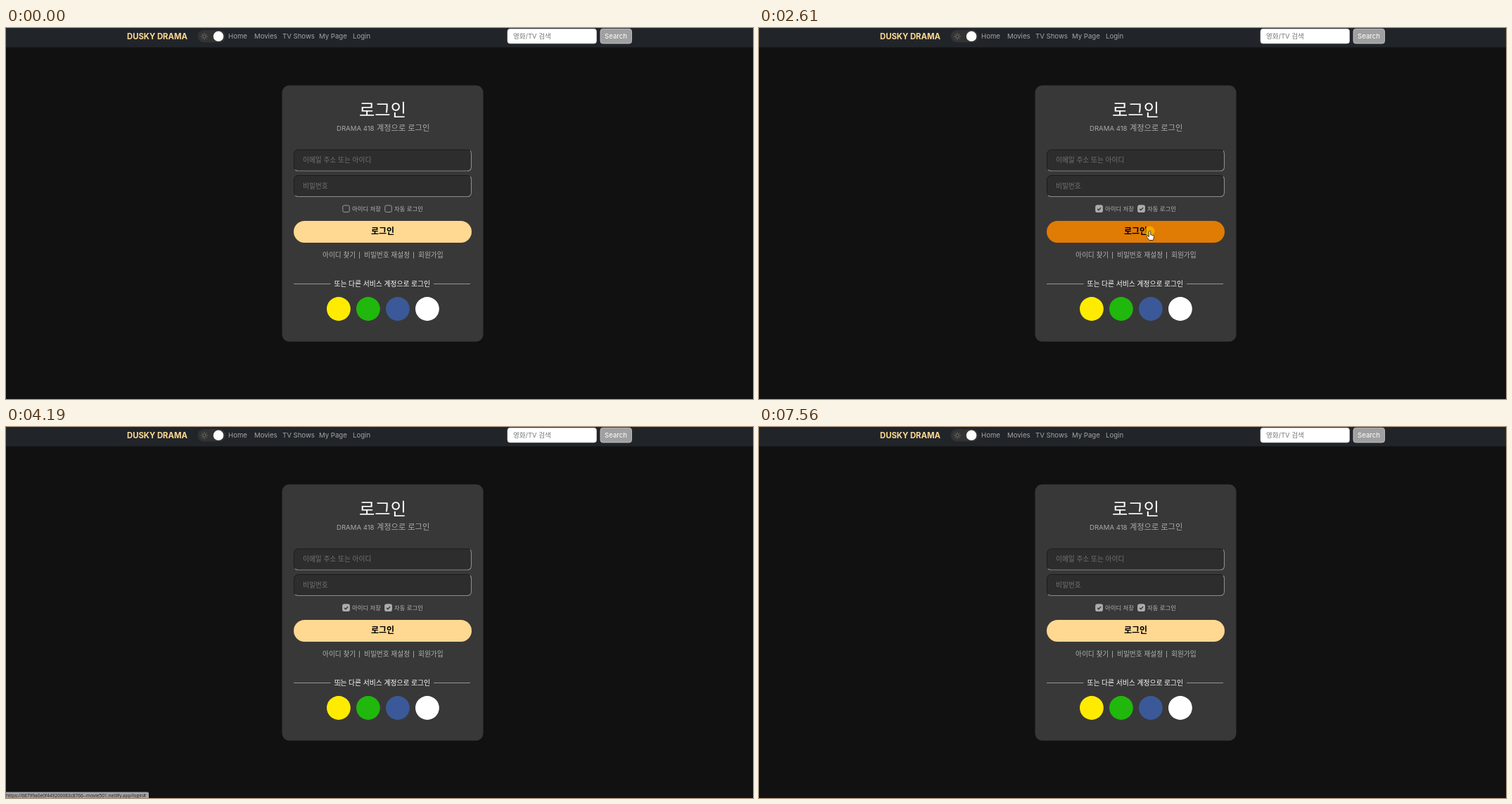
Write an HTML page that moves like this. It is 1062 by 527 pixels and loops after 8300 ms.

```html
<!DOCTYPE html>
<html lang="ko">
<head>
<meta charset="utf-8">
<style>
html, body { margin: 0; width: 100%; height: 100%; overflow: hidden; background: #111; }
svg { display: block; width: 1062px; height: 527px; }
text { font-family: Inter, "Noto Sans CJK KR", "Noto Sans CJK", sans-serif; white-space: pre; }
.system text { font-family: "Open Sans", "Noto Sans CJK KR", "Noto Sans CJK", sans-serif; }
</style>
</head>
<body>
<svg id="stage" viewBox="0 0 1062 527"></svg>
<script>
const LOOP = 8300;
const HOST = '68799a0e0f449200083c8766--movie501.netlify.app';
const stage = document.getElementById('stage');

const text = (x, y, size, fill, str, extra = '') =>
  `<text x="${x}" y="${y}" font-size="${size}" fill="${fill}" ${extra}>${str}</text>`;
const rect = (x, y, w, h, r, fill, extra = '') =>
  `<rect x="${x}" y="${y}" width="${w}" height="${h}" rx="${r}" fill="${fill}" ${extra}/>`;
const circle = (x, y, r, fill, extra = '') =>
  `<circle cx="${x}" cy="${y}" r="${r}" fill="${fill}" ${extra}/>`;
const line = (d, stroke, width = 1, extra = '') =>
  `<path d="${d}" fill="none" stroke="${stroke}" stroke-width="${width}" ${extra}/>`;
const mid = 'text-anchor="middle"';
const hand = id => `id="${id}" data-cursor="hand"`;
const beam = id => `id="${id}" data-cursor="beam"`;

// Input with an inset border, a focus ring and a caret
const field = (id, y, label) =>
  rect(409.5, y, 252, 30, 6, '#2d2d2d', `stroke="#1c1c1c" ${beam(id)}`) +
  line(`M411 ${y + 28.5}q2 1.5 4.5 1.5h240q6 0 6-6v-18q0-3-1.500-4.500`, '#8c8c8c', 1.1) +
  text(422, y + 18, 9.7, '#727575', label) +
  `<g id="${id}Focus">` +
  rect(409.5, y - .5, 252, 30.5, 6, 'none', 'stroke="#eee"') +
  line(`M422.3 ${y + 9.5}v11`, '#ddd', .8, `id="${id}Caret"`) + '</g>';

const check = (id, x, label) =>
  rect(x, 252, 9.5, 9.5, 2, 'none', `stroke="#a5a5a5" stroke-width=".9" ${hand(id)}`) +
  `<g id="${id}Tick">` + rect(x - .5, 251.5, 10.5, 10.5, 2.2, '#acacac') +
  line(`M${x + 2.4} 257l1.7 1.7 3.2-3.6`, '#333', 1.4) + '</g>' +
  text(x + 13.2, 259.8, 8.4, '#b4b4b4', label);

const rays = Array.from({ length: 8 }, (_, i) =>
  line('M282 8.6v-1.7', '#777', .9, `transform="rotate(${i * 45} 282 12)"`)).join('');

const nav =
  rect(0, 0, 1062, 27.5, 0, '#212529') +
  text(172, 15.8, 11.3, '#ffda93', 'DUSKY DRAMA', 'font-weight="700"') +
  rect(272.5, 3, 39.5, 17.5, 8.75, '#333') + circle(302, 11.8, 7.3, '#fff') +
  circle(282, 12, 2.3, 'none', 'stroke="#777" stroke-width=".9"') + rays +
  Object.entries({ Home: 316, Movies: 353, 'TV Shows': 393, 'My Page': 445, Login: 493 })
    .map(([s, x]) => text(x, 15, 9.6, '#a4a6a8', s)).join('') +
  rect(713, 1.3, 126.5, 20.7, 3.5, '#fff', 'stroke="#dee2e6" stroke-width=".6"') +
  text(721, 15, 9.5, '#73777b', '영화/TV 검색') +
  rect(845, 1.3, 44.5, 20.7, 3.5, '#a0a0a0', 'stroke="#d0d0d0" stroke-width=".8"') +
  text(867, 15, 9.6, '#fff', 'Search', mid);

const link = (id, x, label) => text(x, 326, 9.7, '#b2b2b2', label, hand(id));
const icons = ['#ffeb00', '#20b80c', '#3b5998', '#fff'];

const card =
  rect(392.5, 81.5, 286, 364, 10, '#393838') +
  text(535.5, 125, 24.3, '#fff', '로그인', mid) +
  text(470, 145.6, 9.6, '#aaa', 'DRAMA 418') +
  text(527, 145.6, 11.2, '#aaa', '계정으로 로그인') +
  field('mail', 173, '이메일 주소 또는 아이디') +
  field('pass', 209.5, '비밀번호') +
  check('save', 478.8, '아이디 저장') + check('auto', 538.8, '자동 로그인') +
  rect(409, 274, 253, 31, 15.5, '#ffd891', hand('login')) +
  text(535.5, 293, 12, '#000', '로그인', mid + ' font-weight="700"') +
  link('find', 450, '아이디 찾기') + link('reset', 509, '비밀번호 재설정') + link('join', 586, '회원가입') +
  line('M502.5 318v9.5M579.5 318v9.5', '#aaa', .9) +
  line('M409 363.5h52.5M608 363.5h52', '#949494') +
  text(534.8, 367.2, 9.8, '#fff', '또는 다른 서비스 계정으로 로그인', `${mid} font-weight="500" ${beam('other')}`) +
  icons.map((c, i) => circle(472.9 + i * 42, 399, 16.9, c, hand('icon' + i))).join('');

const dialog =
  rect(0, 0, 1062, 527, 0, '#000', 'opacity=".57"') +
  rect(409, -10, 253, 99.5, 5.5, '#fff') +
  text(421, 15.5, 8.75, '#222', HOST + ' 내') + text(421, 28.5, 8.9, '#222', '용:') +
  text(421, 45, 8, '#222', '이메일과 비밀번호를 모두 입력해주세요.') +
  rect(612.7, 55.3, 38.6, 24, 12, '#fff', 'stroke="#465069" stroke-width="1.3"') +
  rect(614.5, 57, 35, 20.5, 10.2, '#4c566e', 'id="ok"') +
  text(632, 70.2, 7.8, '#fff', '확인', mid);

const status =
  rect(-3, 518.5, 206, 12, 2, '#a3a3a3') +
  text(0, 526, 6.55, '#222', `https://${HOST}/login#`);

const shapes =
  '<g id="pointer" fill="#fff" stroke="#111" stroke-width=".8" stroke-linejoin="round">' +
  '<path id="hand" d="M-1.2 1q0-1.3 1.2-1.3t1.2 1.3v4.2l3.6.8q1.3.4 1.2 1.8l-.5 3-1 2.2h-5l-3.3-4q-1-1.4.1-2t1.9.4l.6.8z"/>' +
  '<path id="arrow" d="M0 0v11l2.6-2.4 1.7 3.9 1.6-.7-1.7-3.8h3.6z"/>' +
  line('M-1.5-4.5q1.5 0 1.5 1v7q0 1-1.5 1M1.5-4.5q-1.5 0-1.5 1v7q0 1 1.5 1', '#aaa', .5, 'id="beam"') + '</g>';

stage.innerHTML = rect(0, 0, 1062, 527, 0, '#111') + nav + card +
  `<g id="dialog" class="system">${dialog}</g><g id="status" class="system">${status}</g>` +
  circle(0, 0, 7, '#ffd000', 'id="spot"') + shapes;

const el = {}, box = {};
stage.querySelectorAll('[id]').forEach(n => {
  el[n.id] = n;
  box[n.id] = n.getBBox();
});
box.corner = { x: 1004, y: 520, width: 0, height: 0 };
box.gap = { x: 502, y: 333, width: 0, height: 0 };

// Where the pointer rests: place, arrival, departure, offset from the centre
const route = [
  ['corner', 0, 70], ['mail', 620, 830, -60], ['pass', 1000, 1080, -60], ['save', 1280, 1720, 3, -3],
  ['auto', 1960, 2080], ['login', 2350, 2900, 20, -1], ['ok', 3350, 3500], ['other', 4150, 4390, -60],
  ['gap', 4800, 4820], ['find', 4970, 5150], ['reset', 5400, 5500], ['join', 5780, 5920],
  ['icon0', 6220, 6330, -10, -12], ['icon3', 6680, 6780], ['corner', 7530, LOOP]
].map(([id, from, to, dx = 0, dy = 0]) => {
  const b = box[id];
  return { from, to, x: b.x + b.width / 2 + dx, y: b.y + b.height / 2 + dy };
});
const click = { mail: 800, pass: 1050, save: 1700, auto: 2050, login: 2550, ok: 3460 };
const OPEN = 2740;

const ramp = (t, a, b) => {
  const k = Math.min(1, Math.max(0, (t - a) / (b - a)));
  return k * k * (3 - 2 * k);
};
const within = (t, a, b) => t >= a && t < b;
const show = (node, on) => node.setAttribute('visibility', on ? 'visible' : 'hidden');
const move = (node, x, y) => node.setAttribute('transform', `translate(${x} ${y})`);

function position(t) {
  const i = Math.max(1, route.findIndex(s => t < s.to));
  const a = route[i - 1], b = route[i], k = ramp(t, a.to, b.from);
  return [a.x + (b.x - a.x) * k, a.y + (b.y - a.y) * k];
}

// The page keeps its hover state while the dialog is open
const pageTime = t => within(t, OPEN, click.ok) ? OPEN : t;

function over(id, t) {
  const [x, y] = position(pageTime(t)), b = box[id];
  return within(x, b.x, b.x + b.width) && within(y, b.y, b.y + b.height);
}

// Hover averaged over the last moments gives a transition
function hover(id, t, span) {
  const n = 12;
  let sum = 0;
  for (let i = 0; i < n; i++) sum += over(id, t - span * i / n);
  return sum / n;
}

const targets = [...stage.querySelectorAll('[data-cursor]')];
const linked = ['find', 'reset', 'join', ...icons.map((_, i) => 'icon' + i)];

function drawPointer(t) {
  const [x, y] = position(t);
  const held = x !== position(pageTime(t))[0];
  const target = !held && targets.find(n => over(n.id, t));
  const kind = target ? target.dataset.cursor : 'arrow';
  move(el.pointer, x, y);
  for (const k of ['hand', 'arrow', 'beam']) show(el[k], k === kind && within(t, 70, 7530));

  const hit = Object.values(click).find(c => within(t, c, c + 220));
  show(el.spot, hit);
  if (hit) {
    move(el.spot, ...position(hit));
    el.spot.setAttribute('opacity', .55 * (1 - ramp(t, hit + 80, hit + 220)));
  }
}

function draw(t) {
  drawPointer(t);
  for (const [id, end] of [['mail', click.pass], ['pass', click.save]]) {
    const on = within(t, click[id], end);
    show(el[id + 'Focus'], on);
    show(el[id + 'Caret'], on && (t - click[id]) % 1000 < 500);
  }
  for (const id of ['save', 'auto']) show(el[id + 'Tick'], t >= click[id]);

  const hot = hover('login', t, 200);
  const mix = (a, b) => a + (b - a) * hot;
  el.login.setAttribute('fill', `rgb(${mix(255, 224)},${mix(216, 123)},${mix(145, 4)})`);

  for (const id of linked.slice(0, 3)) el[id].setAttribute('fill', over(id, t) ? '#fff' : '#b2b2b2');
  icons.forEach((_, i) => move(el['icon' + i], 0, -2.5 * hover('icon' + i, t, 110)));
  show(el.dialog, within(t, OPEN, click.ok));
  show(el.status, t < 6730 && linked.some(id => hover(id, t, 250)));
}

function tick() {
  draw(performance.now() % LOOP);
  requestAnimationFrame(tick);
}
tick();
</script>
</body>
</html>
```
